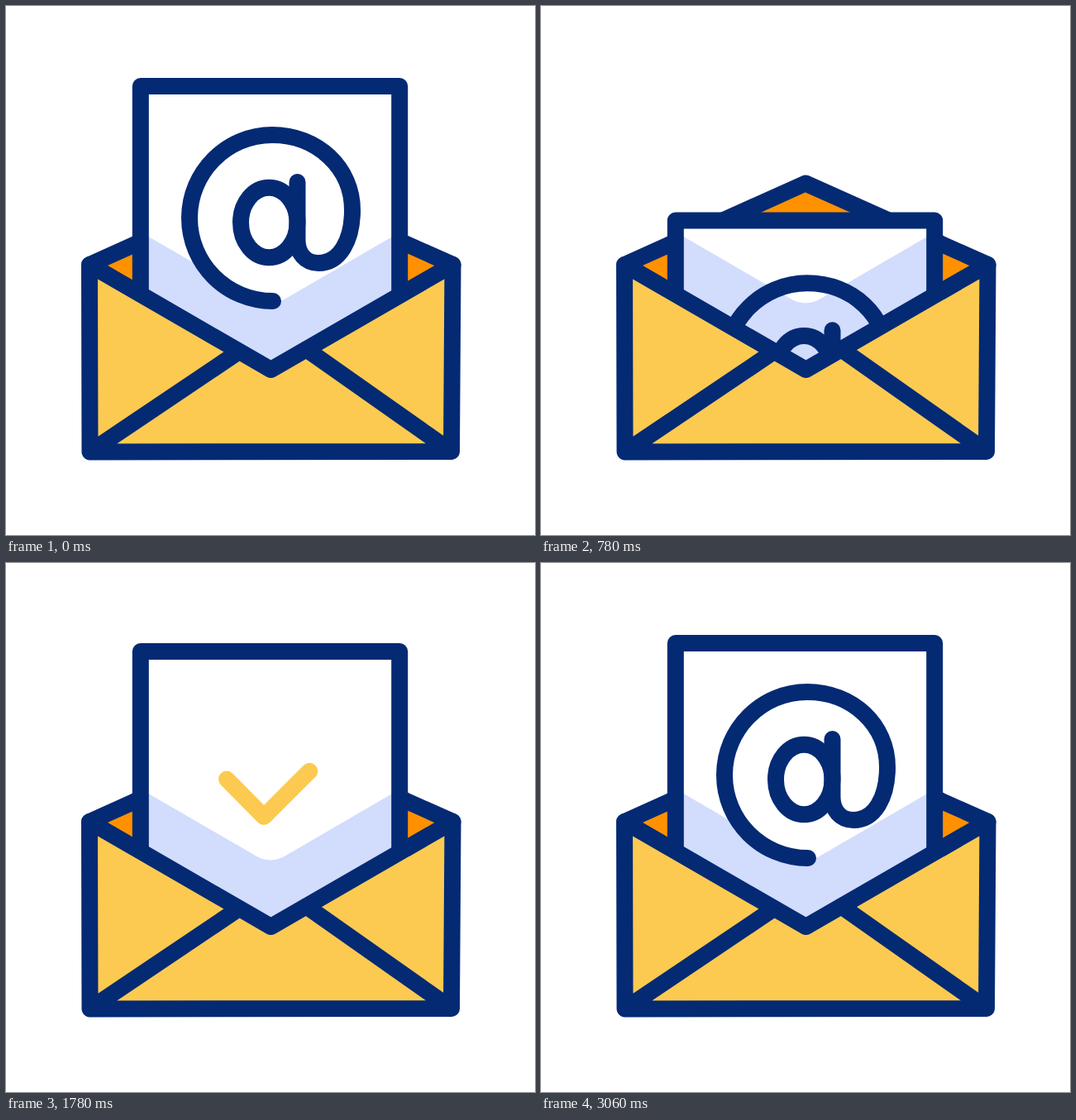
Recreate the animation shown at these times as an HTML page. Size 640 by 640 pixels, loop 3600 ms.

```html
<!DOCTYPE html>
<html lang="en">
<head>
<meta charset="utf-8">
<title>Mail</title>
<style>
  html, body { margin: 0; width: 100%; height: 100%; overflow: hidden; background: #fff; }
  svg { display: block; width: 100%; height: 100%; }
  .line { fill: none; stroke: #042a74; stroke-width: 20; stroke-linecap: round; stroke-linejoin: round; }
</style>
</head>
<body>
<svg viewBox="0 0 640 640">
  <defs>
    <clipPath id="sheetClip"><rect id="sheetMask" x="163" y="97" width="313" height="383"/></clipPath>
  </defs>

  <path class="line" d="M101 313L320 214.500L540.500 313L320 440Z" style="fill:#ff9100"/>

  <rect id="sheet" x="163" y="97" width="313" height="383" fill="#fff"/>
  <path clip-path="url(#sheetClip)" fill="#d2dcfd"
    d="M163 273.500L300 353Q320 366 340 353L476 274V480H163Z"/>
  <rect id="sheetEdge" class="line" x="162.800" y="97" width="313.400" height="383"/>

  <g id="at" class="line">
    <path pathLength="100" d="M352.500 213V283C352.500 299 362 311 378 311C404 311 419 283 419 247C419 196 377 156 322 156C267 156 222 201 222 256.500C222 312 267 357 323 357"/>
    <path pathLength="100" d="M352.500 262A34.250 42.250 0 1 0 284 262A34.250 42.250 0 1 0 352.500 262"/>
  </g>
  <path id="check" class="line" pathLength="100" d="M267 261.500L312 307L392 227" style="stroke:#fcca50"/>

  <path fill="#fcca50" d="M101 313L320 440L540.500 313L539 539L101.500 539.500Z"/>
  <path class="line" d="M101 313L320.500 440L540.500 313L539 539L101.500 539.500ZM101.500 539.500L282 418M539 539L363 415"/>
</svg>
<script>
const LOOP = 3600;
const SHEET_TOP = 97, SHEET_BOTTOM = 480;
const SHEET_DROP = 290, SYMBOL_DROP = 320;
const byId = id => document.getElementById(id);
const at = byId('at'), check = byId('check');
const sheetParts = ['sheet', 'sheetMask', 'sheetEdge'].map(byId);

const progress = (t, start, end) => Math.min(1, Math.max(0, (t - start) / (end - start)));
const smooth = u => u * u * (3 - 2 * u);

// Cubic Bezier easing with control points (x1, 0) and (x2, 1).
function ease(x, x1, x2) {
  let low = 0, high = 1;
  for (let i = 0; i < 24; i++) {
    const s = (low + high) / 2, r = 1 - s;
    if (3 * x1 * r * r * s + 3 * x2 * r * s * s + s * s * s < x) low = s;
    else high = s;
  }
  return smooth((low + high) / 2);
}

// Shows the stretch of a stroke between two fractions of its length.
function trim(path, from, to) {
  const visible = to - from > 0.001;
  path.style.visibility = visible ? 'visible' : 'hidden';
  if (!visible) return;
  path.style.strokeDasharray = from === 0 && to === 1 ? 'none' : `${(to - from) * 100} 300`;
  path.style.strokeDashoffset = -from * 100;
}

function draw(t) {
  const sinking = t < 1040;
  const depth = sinking
    ? ease(progress(t, 300, 1040), 0.82, 0.525)
    : ease(1 - progress(t, 1040, 2000), 0.8, 0.437);
  const top = SHEET_TOP + SHEET_DROP * depth;
  for (const part of sheetParts) {
    part.setAttribute('y', top);
    part.setAttribute('height', SHEET_BOTTOM - top);
  }

  at.setAttribute('transform', `translate(0 ${sinking ? SYMBOL_DROP * depth : 0})`);
  const written = sinking ? 1 : smooth(progress(t, 2640, 3060));
  for (const path of at.children) trim(path, 0, written);

  trim(check, smooth(progress(t, 2240, 2640)), smooth(progress(t, 1500, 1893)));
}

const begin = performance.now();
function tick() {
  draw((performance.now() - begin) % LOOP);
  requestAnimationFrame(tick);
}
draw(0);
requestAnimationFrame(tick);
</script>
</body>
</html>
```
